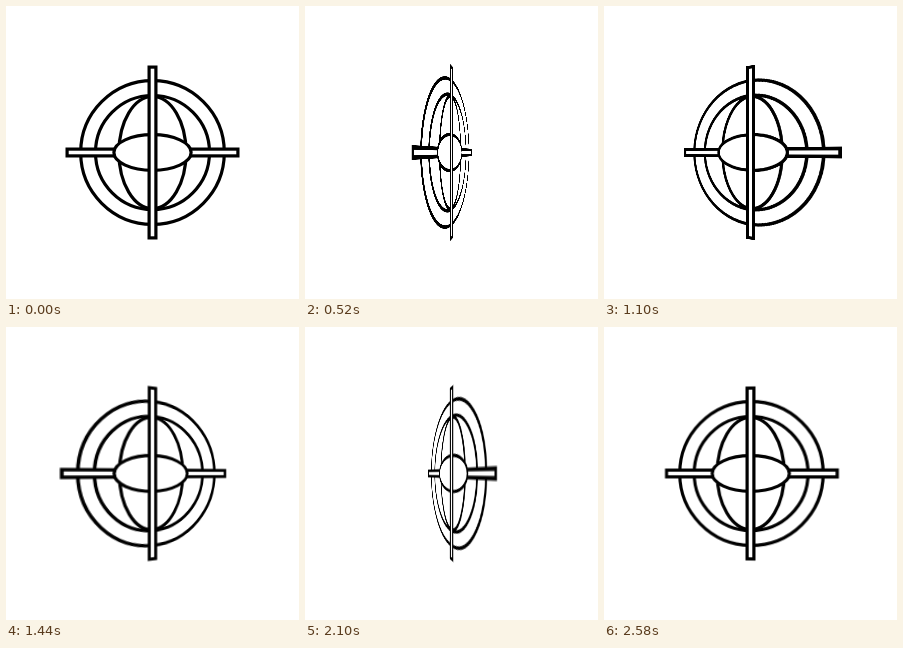
These frames come from a looping animation (293x293 px, 2.6 s). An HTML page:

```html
<!DOCTYPE html>
<html lang="en">
<head>
<meta charset="utf-8">
<title>Spinning globe</title>
<style>
  html, body {
    margin: 0;
    width: 100%;
    height: 100%;
    overflow: hidden;
    background: #fff;
  }
  .stage {
    width: 293px;
    height: 293px;
    perspective: 253px;
  }
  .globe {
    display: block;
    width: 293px;
    height: 293px;
    fill: none;
    stroke: #000;
    stroke-width: 3.2;
  }
  .solid { fill: #fff; }
</style>
</head>
<body>
<div class="stage">
  <svg class="globe" viewBox="-146.5 -146.5 293 293">
    <circle r="71.8"/>
    <circle r="57"/>
    <ellipse rx="33.6" ry="56"/>
    <rect class="solid" x="-85.4" y="-3.4" width="170.8" height="6.8"/>
    <ellipse class="solid" rx="38.6" ry="17.8"/>
    <rect class="solid" x="-3.4" y="-85.4" width="6.8" height="170.8"/>
  </svg>
</div>
<script>
  // One full turn per loop, advancing every 20 ms
  const LOOP = 2600, STEP = 20;
  document.querySelector('.globe').animate(
    [{ transform: 'rotateY(0deg)' }, { transform: 'rotateY(360deg)' }],
    { duration: LOOP, iterations: Infinity, easing: `steps(${LOOP / STEP}, end)` }
  );
</script>
</body>
</html>
```
